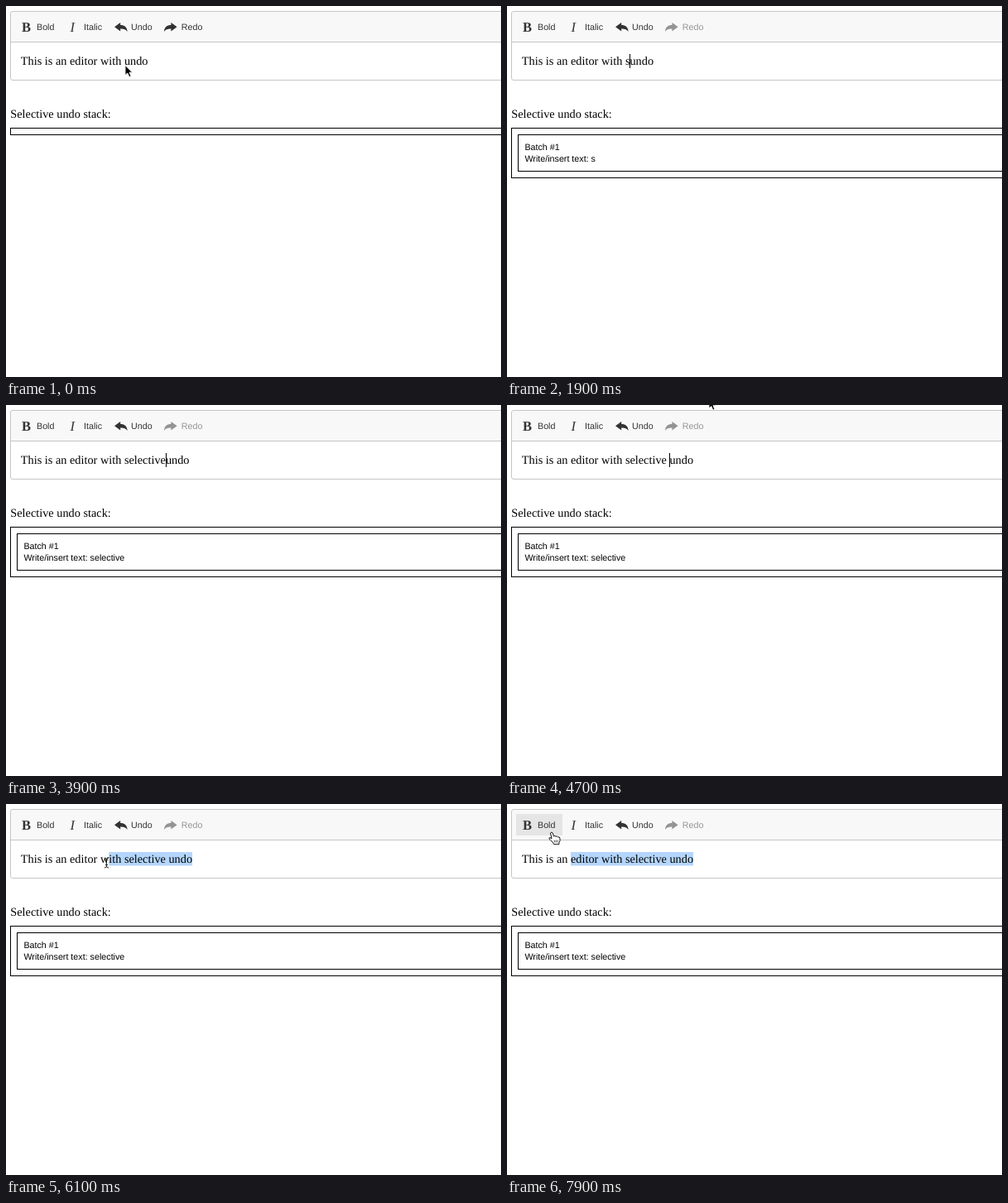
Recreate the animation shown at these times as an HTML page. Size 598x448 px, loop 8 s.

```html
<!DOCTYPE html>
<html lang="en">
<head>
<meta charset="utf-8">
<title>Selective undo</title>
<style>
html, body { margin: 0; width: 100%; height: 100%; overflow: hidden; background: #fff; }
svg { display: block; }
text { text-rendering: geometricPrecision; white-space: pre; }
.serif { font: 14.3px "Liberation Serif", Times, serif; }
.sans { font: 10.72px "Liberation Sans", Arial, sans-serif; }
.icon { font: bold 16.5px "Liberation Serif", Times, serif; fill: #333; }
.slant { font-weight: normal; font-style: italic; }
.label { fill: #333; }
.line { fill: none; stroke: #000; }
</style>
</head>
<body>
<svg width="598" height="448" viewBox="0 0 598 448">
  <defs>
    <path id="bend" d="M0 5.3 L7.2 0 V3 C12 3 15.4 5.6 15.6 11 C13.6 8.2 11 7.4 7.2 7.5 V10.6 Z"/>
  </defs>
  <rect width="598" height="448" fill="#fff"/>

  <path d="M598 7 H8 Q6 7 6 9 V43 H598 Z" fill="#f8f8f8"/>
  <path d="M600 6.5 H8 Q5.5 6.5 5.5 9 V87 Q5.5 89.5 8 89.5 H600 M6 43.5 H600" fill="none" stroke="#c6c6c9"/>
  <rect id="hover" x="11" y="12" width="56" height="26" fill="#e5e5e5"/>

  <text class="icon" x="19" y="30.5">B</text>
  <text class="sans label" x="37" y="28.6">Bold</text>
  <text class="icon slant" x="77.5" y="30.5">I</text>
  <text class="sans label" x="94" y="28.6">Italic</text>
  <use href="#bend" x="131" y="20" fill="#333"/>
  <text class="sans label" x="151" y="28.6">Undo</text>
  <g id="redo">
    <use href="#bend" transform="translate(206.6 20) scale(-1 1)" fill="#333"/>
    <text class="sans label" x="211.8" y="28.6">Redo</text>
  </g>

  <rect id="mark" y="58" height="16.5" fill="#b4d6fd"/>
  <text id="copy" class="serif" x="17.8" y="71"></text>
  <rect id="caret" y="58" width="1" height="17"/>

  <text class="serif" x="5.3" y="134.5">Selective undo stack:</text>
  <rect id="stack" class="line" x="5.5" y="147.5" width="600" height="8"/>
  <g id="batch">
    <rect class="line" x="13.5" y="155.5" width="600" height="44"/>
    <text class="sans" x="21.4" y="174">Batch #1</text>
    <text id="entry" class="sans" x="21.4" y="188"></text>
  </g>

  <g id="arrow">
    <path d="M0 0 V12 L2.8 9.5 L4.9 14.2 L7 13.3 L5 8.7 H8.6 Z" fill="#000" stroke="#fff" stroke-width=".9"/>
  </g>
  <g id="beam" fill="none">
    <path d="M-2.6 -6 Q0 -6 0 -4 Q0 -6 2.6 -6 M0 -4.5 V4.5 M-2.6 6 Q0 6 0 4 Q0 6 2.6 6 M-1.5 2.5 H1.5" stroke="#222"/>
  </g>
  <g id="hand">
    <path d="M0 1 Q1.5 -1 2.7 1 L4 5 Q5.6 3.9 6.5 5.2 Q8 4.4 9 5.9 Q11 5.2 11.4 7.2 Q12.2 10.5 10.4 12.5 V14.7 H4.2 Q3.2 12 .2 9.8 Q-2.6 7.8 -1.4 6.8 Q-.4 6.2 1.5 7.8 Z"
      fill="#fff" stroke="#111" stroke-linejoin="round"/>
    <path d="M4.8 9.5 V12.5 M6.7 9.5 V12.5 M8.6 9.5 V12.5" stroke="#111" stroke-width=".7"/>
  </g>
</svg>
<script>
const LOOP = 8000, STEP = 100, BLINK = 500;
const LEAD = "This is an editor with ", TYPED = "selective ", TAIL = "undo";
const $ = id => document.getElementById(id);
const copy = $("copy"), entry = $("entry"), left = 17.8;

// Moment at which each character of TYPED arrives.
const keys = [1900, 2200, 2400, 2600, 2800, 3100, 3300, 3600, 3900, 4300];
const PRESS = 5500;

// Pointer waypoints: time, x, y.
const early = [[300, 144, 71.5], [600, 146, 66], [1000, 146, 66], [1200, 156, 75], [1500, 180.5, 95]];
const late = [
  [4700, 244, -8], [4900, 264, 12], [5100, 269, 42], [5300, 259, 62], [5500, 247, 68],
  [5600, 236, 69], [5800, 192, 71], [6100, 121.5, 71], [6400, 99, 67], [6800, 84.5, 62],
  [7200, 77, 64], [7400, 76, 63], [7600, 64, 48], [7700, 57, 38], [7900, 52.5, 34]
];

function along(path, t) {
  const i = path.findIndex(p => p[0] > t);
  if (i === 0) return path[0].slice(1);
  if (i < 0) return path[path.length - 1].slice(1);
  const [a, b] = [path[i - 1], path[i]];
  const k = (t - a[0]) / (b[0] - a[0]);
  return [a[1] + (b[1] - a[1]) * k, a[2] + (b[2] - a[2]) * k];
}

const show = (id, on) => $(id).setAttribute("visibility", on ? "visible" : "hidden");
const charX = n => left + (n ? copy.getSubStringLength(0, n) : 0);

function nearestChar(x) {
  const n = copy.textContent.length;
  let best = n;
  for (let i = 0; i < n; i++)
    if (Math.abs(charX(i) - x) < Math.abs(charX(best) - x)) best = i;
  return best;
}

function pointer(t) {
  const shown = t < 1900 || t >= 4700;
  const [x, y] = along(t < 1900 ? early : late, t);
  let kind = "arrow";
  if (t >= 7700) kind = "hand";
  else if (t >= 400 && y > 44 && y < 89) kind = "beam";
  for (const id of ["arrow", "beam", "hand"]) show(id, shown && id === kind);
  $(kind).setAttribute("transform", `translate(${x} ${y})`);
  return x;
}

function draw(time) {
  const t = Math.floor(time / STEP) * STEP;
  const count = keys.filter(k => k <= t).length;
  const word = TYPED.slice(0, count);
  copy.textContent = LEAD + word + TAIL;
  entry.textContent = "Write/insert text: " + word;

  show("batch", count > 0);
  $("stack").setAttribute("height", count ? 60 : 8);
  $("redo").setAttribute("opacity", count ? 0.5 : 1);
  show("hover", t >= 7700);

  const x = pointer(t);
  const end = copy.textContent.length;
  const from = t > PRESS ? nearestChar(t >= 7200 ? 77 : x) : end;
  const start = charX(from);
  $("mark").setAttribute("x", start);
  $("mark").setAttribute("width", Math.max(0, charX(end) - start));

  // The caret restarts its blink at every click or key.
  const since = t >= PRESS ? PRESS : count ? keys[count - 1] : 500;
  const lit = t >= 500 && Math.floor((t - since) / BLINK) % 2 === 0;
  show("caret", lit && from === end);
  const at = t >= PRESS ? end : LEAD.length + count;
  $("caret").setAttribute("x", Math.round(charX(at) - 0.4));
}

function tick(now) {
  draw(now % LOOP);
  requestAnimationFrame(tick);
}
draw(0);
requestAnimationFrame(tick);
</script>
</body>
</html>
```
